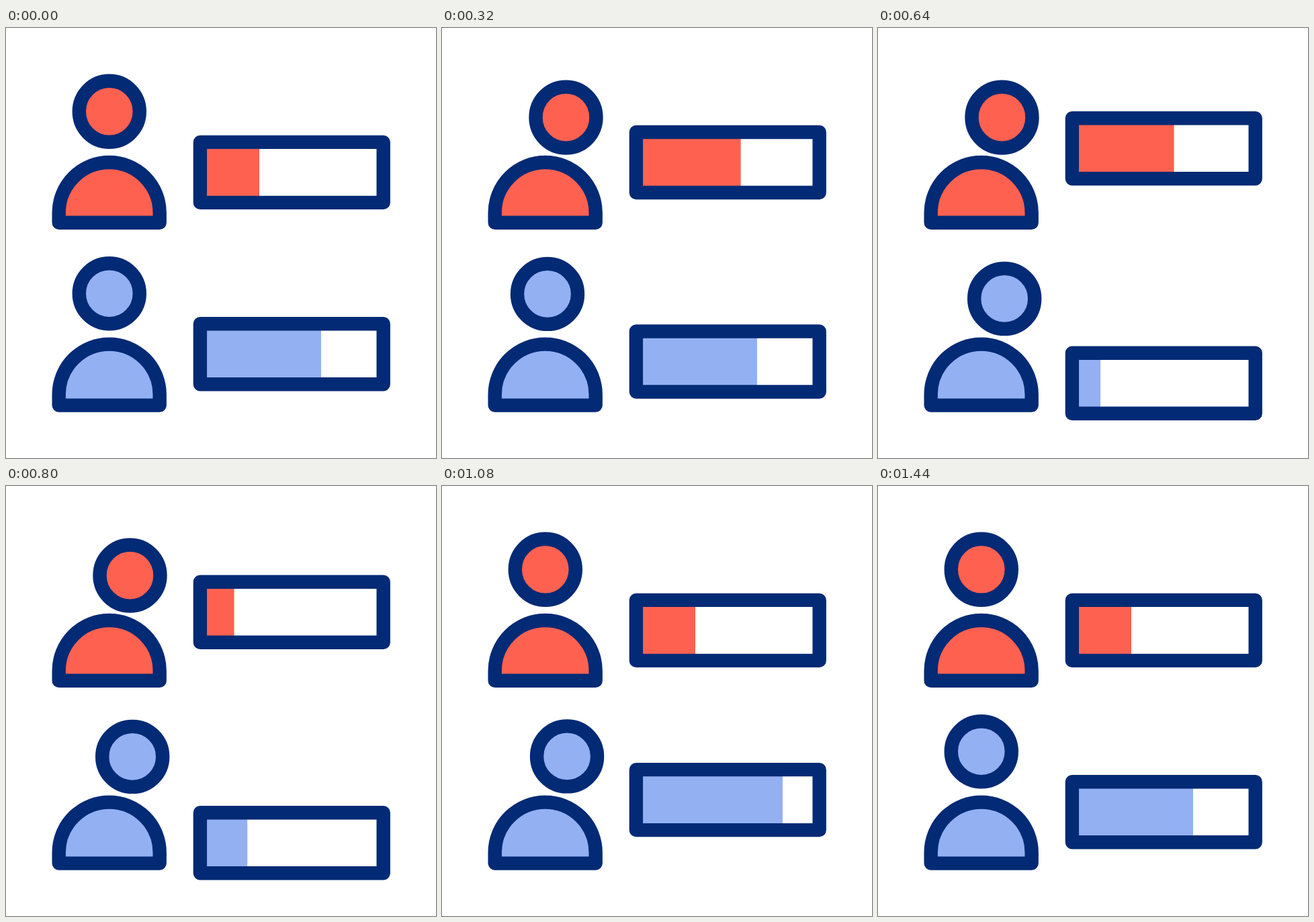
Animation of 640x640 px, one loop 1.48 s. Source, as an HTML page:

```html
<!DOCTYPE html>
<html lang="en">
<head>
<meta charset="utf-8">
<title>Two people with level bars</title>
<style>
  html, body { margin: 0; width: 100%; height: 100%; overflow: hidden; background: #fff; }
  svg { display: block; width: 100%; height: 100%; }
  .line { stroke: #032a75; stroke-width: 20.4; stroke-linejoin: round; }
  .red { fill: #ff6150; }
  .blue { fill: #93b0f3; }
  .empty { fill: none; }
</style>
</head>
<body>
<svg viewBox="0 0 640 640">
  <g class="red">
    <path class="line" d="M78.7 289.7V275a75 75 0 0 1 150 0V289.7Z"/>
    <ellipse class="line" id="redHead" cx="153.8" cy="124.3" rx="45" ry="45.5"/>
    <g id="redBar">
      <rect id="redFill" x="289" y="170" height="90"/>
      <rect class="line empty" x="288.9" y="169.9" width="272.8" height="90"/>
    </g>
  </g>
  <g class="blue">
    <path class="line" d="M78.7 561.6V545.6a75 75 0 0 1 150 0V561.6Z"/>
    <circle class="line" id="blueHead" cx="153.8" cy="395.2" r="45"/>
    <g id="blueBar">
      <rect id="blueFill" x="289" y="440.4" height="90"/>
      <rect class="line empty" x="288.9" y="440.3" width="272.8" height="90"/>
    </g>
  </g>
</svg>
<script>
  const LOOP = 1480, STEP = 40;
  const LAG = 195; // blue head and fill follow the red ones

  const el = id => document.getElementById(id);
  const move = (id, x, y) => el(id).setAttribute('transform', `translate(${x} ${y})`);
  const setFill = (id, width) => el(id).setAttribute('width', width);

  // Smooth progress from 0 to 1 between two times
  function ease(t, from, to) {
    const u = Math.min(1, Math.max(0, (t - from) / (to - from)));
    return u * u * (3 - 2 * u);
  }

  // Out to a peak, over to a rebound, then back to rest
  const swing = (t, peak, rebound, start, top, turn, end) =>
    peak * ease(t, start, top) +
    (rebound - peak) * ease(t, top, turn) -
    rebound * ease(t, turn, end);

  const lean = t => ease(t, 90, 275) - ease(t, 857, 1042);

  function draw(t) {
    const red = lean(t), blue = lean(t - LAG);
    move('redHead', 30.7 * red, 8.8 * red);
    move('blueHead', 34.4 * blue, 7.7 * blue);

    move('redBar', 0, -36.2 * (ease(t, 33, 685) - ease(t, 685, 1038)));
    move('blueBar', 0, swing(t, 48, -19.6, 117, 764, 1110, 1433));

    setFill('redFill', 88 + swing(t, 137, -38, 140, 503, 810, 1040));
    setFill('blueFill', 180 + swing(t - LAG, -148.5, 39, 138, 505, 847, 1238));
  }

  const start = performance.now();
  function tick() {
    const t = (performance.now() - start) % LOOP;
    // 25 pictures a second, with a little slack for clock jitter
    draw(Math.floor(t / STEP + 0.1) * STEP % LOOP);
    requestAnimationFrame(tick);
  }
  tick();
</script>
</body>
</html>
```
